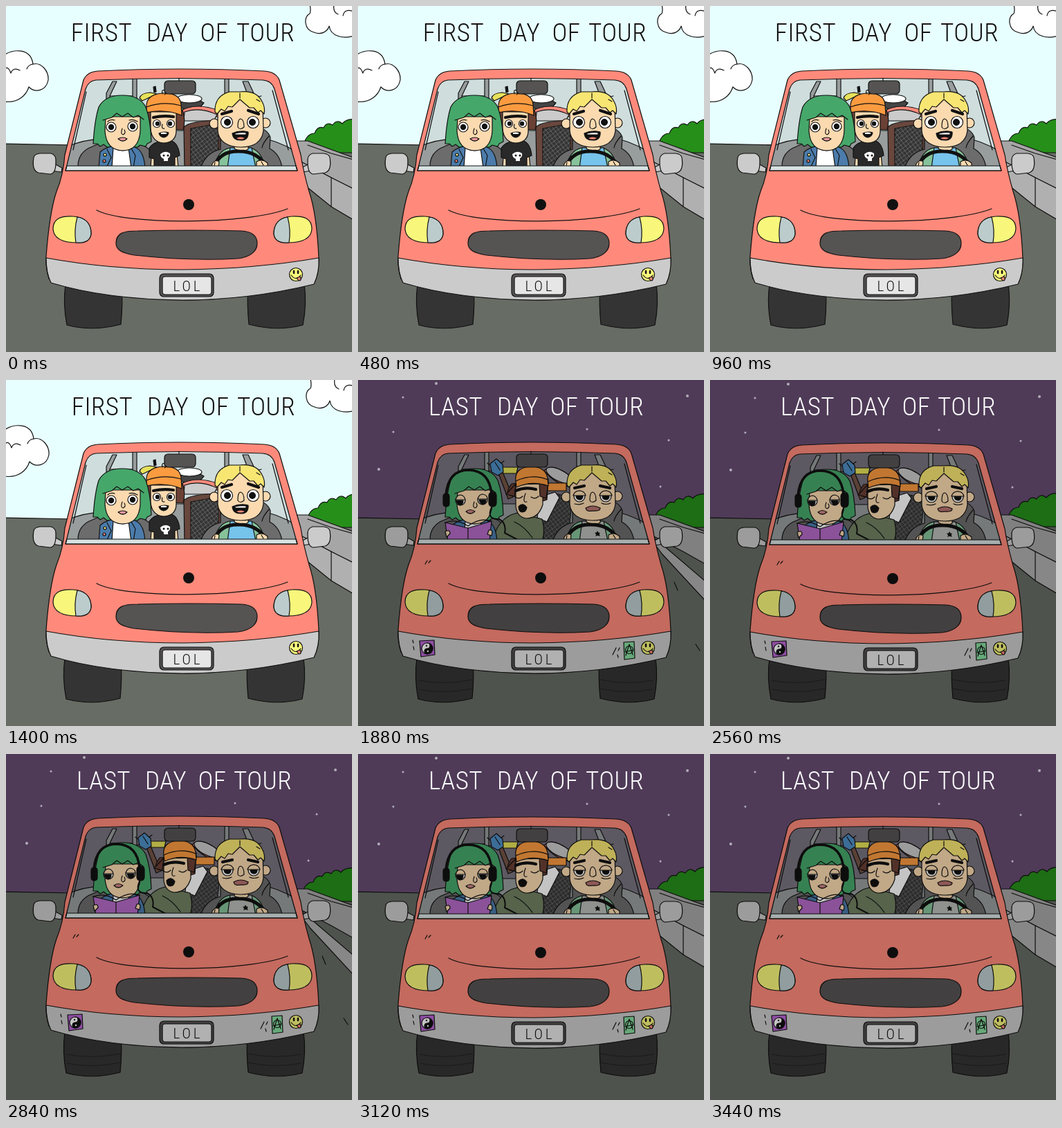
An HTML page for the animation above (3480 ms loop, 500 by 500 pixels).

```html
<!DOCTYPE html>
<html lang="en">
<head>
<meta charset="utf-8">
<title>Tour van</title>
<style>
html, body { margin: 0; width: 100%; height: 100%; overflow: hidden; }
svg { display: block; width: 500px; height: 500px; fill: none; stroke: #111; stroke-width: 1.2; stroke-linecap: round; stroke-linejoin: round; }
text { font-family: "Roboto Condensed", Roboto, sans-serif; font-stretch: 75%; font-weight: 100; text-anchor: middle; stroke: none; }
.title { font-size: 37px; letter-spacing: .5px; fill: #111; }
.title.late { fill: #fff; }
.plate { font-size: 21px; letter-spacing: 4px; fill: #111; }
.bare { stroke: none; }
.ink { fill: #111; }
.white { fill: #fff; }
.skin { fill: #fbdab0; }
.grey { fill: #cbcbcb; }
.seat { fill: #6c6c6c; }
.dark { fill: #565353; }
.red { fill: #ff8a7b; }
.yellow { fill: #f8f77c; }
.orange { fill: #fb9b40; }
.green { fill: #46a76a; }
.blond { fill: #f8e673; }
.brown { fill: #6b4035; }
.denim { fill: #4c7cab; }
.shirt { fill: #86c39a; }
.fat { stroke-width: 4.2; }
</style>
</head>
<body>
<svg viewBox="0 0 500 500">
  <defs>
    <clipPath id="pane"><path d="M130 107Q250 102 371 107Q384 108 388 120L420 232H87L115 120Q119 108 130 107Z"/></clipPath>
    <pattern id="mesh" width="7" height="7" patternUnits="userSpaceOnUse" patternTransform="rotate(8)">
      <path d="M0 0L7 7M7 0L0 7" stroke="#777" stroke-width=".8"/>
    </pattern>
    <g id="wheel">
      <path fill="#343434" d="M86 402Q82 430 88 461Q125 471 166 460Q169 430 167 405Z"/>
    </g>
    <g id="lamp">
      <path class="yellow" d="M68 322C68 307 80 303 97 304C115 305 123 315 123 329C122 339 114 343 103 342C84 342 69 337 68 322Z"/>
      <path fill="#bccccd" d="M103 305C117 307 123 317 123 329C122 339 114 343 101 342Q98 324 103 305Z"/>
    </g>
    <g id="mirror">
      <path class="grey" d="M70 228L81 234L80 240L66 238Z"/>
      <path class="grey" d="M40 219Q41 214 49 213L65 213Q73 215 72 226Q72 242 64 243L47 241Q37 238 40 219Z"/>
    </g>
  </defs>

  <rect id="air" class="bare" width="500" height="210"/>

  <g class="day" id="clouds">
    <path class="white" d="M-3 71C10 62 36 60 39 84C51 81 62 94 61 107C58 123 42 126 33 117C29 130 16 141 -3 138Z"/>
    <path d="M-2 91Q3 86 7 97Q10 88 20 93M39 84Q32 85 30 91"/>
    <path class="white" d="M439 -3C440 4 441 7 439 11C430 15 430 34 445 38C455 42 464 38 467 29C469 44 488 48 503 43V-3Z"/>
    <path d="M474 -2Q472 9 480 12M503 8Q489 3 487 14"/>
  </g>
  <g class="night bare" id="stars" fill="#e8dff0"></g>

  <path fill="#676c64" d="M-2 199L100 201H502V502H-2Z"/>

  <path id="hedge" fill="#268f1a" d="M430 200Q435 184 446 184Q450 173 459 176Q463 167 472 172Q478 163 486 170Q492 162 508 164V212H430Z"/>
  <path fill="#a6a6a6" d="M380 195H436L502 219V266L470 248L420 222Z"/>
  <path d="M436 201L470 213L502 222"/>
  <g id="curb">
    <path fill="#b0b0b0" d="M415 219L470 248L502 264V309L470 290L428 256Z"/>
    <path d="M470 248V290"/>
  </g>
  <g id="gap">
    <path fill="#b0b0b0" d="M415 219L440 238L502 291V319L440 252Z"/>
    <path d="M457 292L462 304M488 382L494 391"/>
  </g>

  <g id="wheels">
    <use href="#wheel"/>
    <use href="#wheel" transform="translate(517) scale(-1 1)"/>
    <g class="night" stroke="#222">
      <path d="M90 434Q125 441 166 433M90 447Q125 454 166 446M351 433Q390 441 427 434M351 446Q390 454 427 447"/>
    </g>
  </g>

  <g id="van">
    <use href="#mirror"/>
    <use href="#mirror" transform="translate(508) scale(-1 1)"/>
    <path class="red" d="M133 94Q250 88 373 94Q390 95 395 107L426 215Q429 236 438 268Q449 300 452 364Q452 383 448 394Q350 426 255 425Q145 424 62 394Q57 378 58 362Q63 297 73 268Q83 244 85 215L112 107Q117 95 133 94Z"/>
    <path class="grey" d="M58 364Q150 381 255 381Q360 380 452 364Q453 386 445 402Q350 425 255 425Q145 424 65 400Q58 386 58 364Z"/>

    <g clip-path="url(#pane)">
      <rect id="glass" class="bare" x="80" y="95" width="350" height="145"/>
      <path fill="#989d9d" d="M80 207Q115 190 145 193V126L154 109H160L150 130V180H350V130L342 109H350L358 126V188Q400 195 430 218V245H80Z"/>
      <path fill="#989d9d" d="M183 104H189V150H183ZM316 104H322V150H316Z"/>
      <path d="M150 130H183M322 130H350M116 124L97 208M385 122L408 208"/>
      <path class="seat" d="M104 234Q103 211 125 203Q150 189 199 202Q215 209 215 234Z"/>

      <g class="day">
        <path fill="#e7e25a" d="M193 133Q195 126 208 125L218 127L197 137Z"/>
        <path class="ink" d="M213 117L216 116L217 124L214 125Z"/>
        <path fill="#444" d="M246 144Q266 127 286 140L280 147Q260 153 246 144Z"/>
        <ellipse class="white" cx="265" cy="134" rx="18" ry="6"/>
        <path class="red" d="M253 151Q276 139 307 151V160H253Z"/>
        <path class="grey" d="M258 153Q280 145 305 157L300 166H257Z"/>
        <path fill="#69473d" d="M257 175Q265 166 309 165L312 234H258Z"/>
        <path fill="#333" d="M267 177L307 170V234H267Z"/>
        <path class="bare" fill="url(#mesh)" d="M267 177L307 170V234H267Z"/>
      </g>
      <g class="night">
        <path fill="#e7e25a" d="M208 127H231L229 136H209Z"/>
        <path fill="#755345" d="M203 136L209 134L224 170L217 173Z"/>
        <path fill="#4e8ec4" d="M191 122L200 115L209 123L210 134L202 139L193 134Z"/>
        <path d="M190 124L187 121M193 132L188 133M207 121L211 118M198 120L205 131"/>
        <path class="red" d="M269 132Q282 119 310 143L307 155Q287 153 269 132Z"/>
        <ellipse class="grey" cx="291" cy="139" rx="21" ry="8" transform="rotate(27 291 139)"/>
        <path class="orange" d="M269 150H301V161H274Z"/>
        <path fill="#393939" d="M280 164L310 171L303 234H261Z"/>
        <path class="bare" fill="url(#mesh)" d="M280 164L310 171L303 234H261Z"/>
      </g>

      <path class="seat" d="M281 234Q289 212 310 207V179Q315 169 360 174Q378 177 382 190L381 206Q396 214 399 234Z"/>
      <path d="M380 188Q371 198 370 205"/>

      <!-- back seat -->
      <g class="day">
        <path class="skin" d="M211 205L246 203L249 234H209Z"/>
        <path fill="#292929" d="M207 205Q214 196 226 195H239Q249 198 251 216L244 219V234H214V221L207 219Z"/>
        <path class="brown" d="M205 150H255Q260 164 256 179L207 176Q201 164 205 150Z"/>
        <path class="skin" d="M209 153H246V180Q246 197 228 198Q211 197 209 178Z"/>
        <path class="orange" d="M203 146Q202 128 226 126Q251 125 253 142L254 158Q229 148 203 154Z"/>
        <path d="M203 146Q228 137 253 144M226 127Q224 120 230 122Q234 126 229 128"/>
        <path class="fat" d="M213 161Q227 158 242 160"/>
        <circle class="white" cx="218" cy="170" r="5.5"/><circle class="white" cx="238" cy="170" r="5.5"/>
        <circle class="ink" cx="219" cy="170" r="2.6"/><circle class="ink" cx="237" cy="170" r="2.6"/>
        <path d="M226 171Q224 178 229 177"/>
        <path class="ink" d="M221 184Q228 181 235 183Q234 189 228 190Q222 189 221 184Z"/>
        <path class="white bare" d="M224 183Q228 182 232 183V185H224Z"/>
        <path class="white bare" d="M223 214Q230 208 237 213Q238 218 234 220V224H228V221Q223 219 223 214Z"/>
        <circle class="ink bare" cx="228" cy="216" r="1.5"/><circle class="ink bare" cx="234" cy="216" r="1.5"/>
      </g>
      <g class="night">
        <path class="white" d="M262 170L285 163L291 171L273 206L259 200Z"/>
        <path fill="#718061" d="M195 234Q201 200 230 193L266 202Q271 219 266 234Z"/>
        <path d="M226 206Q241 213 252 229"/>
        <path class="brown" d="M222 151L275 144L273 174L264 177L220 168Q212 164 222 151Z"/>
        <path class="skin" d="M228 152L267 151L267 181Q261 201 243 201Q230 199 228 184Z"/>
        <path class="brown" d="M228 151L214 166L226 169ZM262 149L275 148L272 172L263 169Z"/>
        <path class="orange" d="M228 148Q225 128 249 126Q271 126 274 143L275 154Q251 146 229 156Z"/>
        <path d="M228 147Q252 136 274 145"/>
        <path class="fat" d="M228 161Q242 155 257 159"/>
        <path d="M227 170Q233 174 238 169M250 170Q256 174 261 169M242 165Q237 179 244 177"/>
        <path class="ink" d="M232 184Q238 177 244 185Q243 192 237 192Q232 191 232 184Z"/>
      </g>

      <!-- passenger -->
      <path class="green" d="M134 146Q143 129 168 129Q193 129 202 146Q209 165 210 196L204 199L202 203L194 201L190 204H146L141 200L136 203L132 199L126 199Q128 165 134 146Z"/>
      <path class="denim" d="M134 234L136 211Q149 200 164 203H181Q199 204 201 234Z"/>
      <path class="white" d="M155 204L177 205L181 234H153Z"/>
      <path class="skin" d="M160 197H176V206Q169 212 160 205Z"/>
      <path class="skin" d="M144 160H194V181Q192 209 168 209Q145 208 143 181Z"/>
      <path class="green bare" d="M138 150L199 150L199 164L191 158L184 161L176 155L168 160L160 155L153 161L140 165Z"/>
      <path d="M140 165L153 161L160 155L168 160L176 155L184 161L191 158L199 164"/>
      <path d="M168 177Q165 185 169 186Q174 184 171 179"/>
      <g class="day">
        <path d="M147 167Q151 163 157 165M178 165Q184 163 190 167"/>
        <circle class="white" cx="152" cy="175" r="7"/><circle class="white" cx="183" cy="174" r="7"/>
        <circle class="ink" cx="152" cy="175" r="3.6"/><circle class="ink" cx="183" cy="174" r="3.6"/>
        <path fill="#f29aa0" d="M162 192Q169 188 175 192Q169 198 162 192Z"/>
        <path d="M146 207L152 219L145 234M181 206L187 216L184 234"/>
        <circle class="yellow" cx="143" cy="215" r="2"/><circle class="red" cx="142" cy="224" r="2"/>
      </g>
      <g class="night">
        <circle class="white" cx="148" cy="175" r="7"/><circle class="white" cx="180" cy="174" r="7"/>
        <path class="ink" d="M142 175H152Q152 182 147 182Q143 180 142 175ZM175 174H185Q185 181 180 181Q176 179 175 174Z"/>
        <path class="skin" d="M141 174Q143 167 148 167Q154 168 155 174ZM173 173Q175 166 180 166Q187 167 187 173Z"/>
        <path fill="#cf8580" d="M156 191Q162 186 169 191Q162 197 156 191Z"/>
        <path stroke-width="3.5" d="M127 168Q130 131 160 131Q190 132 193 166"/>
        <rect class="ink" x="123" y="165" width="9" height="19" rx="4"/>
        <rect class="ink" x="189" y="163" width="11" height="21" rx="5"/>
        <path stroke-width="2" d="M194 183Q184 203 204 202Q215 208 212 222L235 234"/>
        <path fill="#b56ac8" d="M126 207L159 215L193 205L190 234H130Z"/>
        <path d="M159 215V234M126 207Q143 201 159 212Q177 199 193 205"/>
        <path class="skin" d="M126 220Q133 216 133 223L128 228ZM189 218Q196 216 193 226L187 224Z"/>
      </g>

      <!-- driver -->
      <path class="shirt" d="M301 234Q305 209 323 205H354Q371 211 374 234Z"/>
      <path class="tee" d="M324 205H355L361 234H320Z"/>
      <path class="skin" d="M330 198H350V207Q341 213 330 206Z"/>
      <circle class="skin" cx="301" cy="170" r="7"/><circle class="skin" cx="375" cy="169" r="7"/>
      <path class="skin" d="M306 145Q338 125 371 145L372 180Q369 204 339 204Q309 203 306 181Z"/>
      <path class="blond" d="M302 153Q301 130 323 124L337 124Q362 121 370 138Q375 147 373 156L368 151L364 154L358 147L352 147L338 135L327 146L321 145L316 152L311 149L305 156Z"/>
      <path d="M338 126V133M365 131L369 130M362 135L367 138"/>
      <path d="M339 163Q335 163 335 175Q338 180 344 175Q344 164 339 163Z"/>
      <g class="day">
        <path class="fat" d="M312 156L326 152M350 151L365 156"/>
        <circle class="white" cx="319" cy="168" r="8.5"/><circle class="white" cx="357" cy="168" r="8.5"/>
        <circle class="ink" cx="320" cy="168" r="4.4"/><circle class="ink" cx="356" cy="168" r="4.4"/>
        <path class="ink" d="M327 184Q338 179 350 182Q351 194 339 194Q328 194 327 184Z"/>
        <path class="white" d="M331 184Q339 182 347 183V186H331Z"/>
        <path class="red bare" d="M333 191Q339 188 345 191Q339 194 333 191Z"/>
      </g>
      <g class="night">
        <path class="fat" d="M313 157L327 154M350 154L364 157"/>
        <g id="awake">
          <circle class="white" cx="320" cy="169" r="8"/><circle class="white" cx="358" cy="169" r="8"/>
          <path class="ink" d="M315 168H325Q325 174 320 174Q315 173 315 168ZM353 168H363Q363 174 358 174Q353 173 353 168Z"/>
          <path class="skin" d="M311 168Q313 161 320 161Q327 161 329 168ZM349 168Q351 161 358 161Q365 161 367 168Z"/>
          <path d="M313 180Q320 182 326 179M352 179Q358 182 365 179"/>
          <path fill="#b7736f" d="M329 186Q339 180 350 186Q350 191 339 190Q330 192 329 186Z"/>
        </g>
        <g id="asleep">
          <path d="M311 169Q319 177 328 169M349 169Q358 177 367 169"/>
          <path fill="#b7736f" d="M329 186Q339 178 350 186Q349 192 339 190Q331 192 329 186Z"/>
          <path class="white" d="M333 185Q339 182 346 185Z"/>
        </g>
        <path class="ink" d="M346 220L347 222L349 222L348 224L349 226L346 225L344 226L345 224L343 222L345 222Z"/>
      </g>
      <path stroke-width="5" d="M301 232Q309 209 337 210Q364 210 376 232"/>
      <path class="skin" d="M298 228Q303 221 308 225L307 234H297ZM362 225Q370 220 378 227V234H362Z"/>
      <path d="M302 226L301 231M369 225L372 230"/>
    </g>

    <path d="M250 104V109"/>
    <rect class="dark" x="229" y="108" width="45" height="19" rx="5"/>
    <path fill="#d8e2e2" d="M88 231H419L421 238H86Z"/>
    <path d="M130 107Q250 102 371 107Q384 108 388 120L421 238H86L115 120Q119 108 130 107Z"/>

    <circle class="ink bare" cx="264" cy="287" r="8"/>
    <path d="M131 295C172 317 348 316 407 293"/>
    <path class="dark" d="M159 343C159 328 170 325 190 325Q265 323 340 325C357 326 363 333 363 343C363 356 351 363 335 365Q265 369 185 360C167 357 159 352 159 343Z"/>
    <use href="#lamp"/>
    <use href="#lamp" transform="translate(510) scale(-1 1)"/>
    <rect class="dark" x="222" y="387" width="78" height="33" rx="6"/>
    <rect fill="#e6e6e6" x="226" y="391" width="71" height="26" rx="4"/>
    <text class="plate" x="263" y="412">LOL</text>

    <circle class="yellow" cx="419" cy="388" r="9.5"/>
    <path class="ink" d="M416 383V386M422 383V386" stroke-width="2.5"/>
    <path d="M412 389Q419 398 426 389"/>
    <path class="red" d="M420 393L425 391Q428 397 423 397Z"/>

    <g class="night">
      <path d="M97 267L100 262M102 265L105 262M79 377L80 381M80 386L81 391M373 388L368 398M378 388L376 392M375 398L376 402"/>
      <path fill="#b764d1" d="M89 378L110 377L111 398L91 401Z"/>
      <circle class="white" cx="100" cy="389" r="8"/>
      <path class="ink" d="M100 381A4 4 0 0 1 100 389A4 4 0 0 0 100 397A8 8 0 0 0 100 381Z"/>
      <circle class="ink bare" cx="99" cy="385" r="1.2"/><circle class="white bare" cx="101" cy="393" r="1.2"/>
      <path fill="#86db9e" d="M384 380L399 379L400 403L385 405Z"/>
      <circle cx="392" cy="391" r="5.5"/><path d="M387 399L392 383L397 398M386 394L398 391"/>
    </g>
  </g>

  <rect class="night bare" width="500" height="500" fill="#000" opacity=".23"/>

  <g class="day title" id="first">
    <text x="138" y="51">FIRST</text><text x="233" y="51">DAY</text><text x="301" y="51">OF</text><text x="375" y="51">TOUR</text>
  </g>
  <g class="night title late">
    <text x="141" y="51">LAST</text><text x="231" y="51">DAY</text><text x="298" y="51">OF</text><text x="371" y="51">TOUR</text>
  </g>
</svg>
<script>
const LOOP = 3480, STEP = 40, DUSK = 1720, NAP = [2200, 2560];
const hedgeX = [0, -1, 2, 5, 4, 3, 1, -2];
const starAt = [[113, 6], [65, 26], [51, 76], [30, 130], [331, 72], [437, 155], [476, 24], [449, 88]];

const $ = id => document.getElementById(id);
const all = name => document.querySelectorAll("." + name);
const show = (el, on) => { el.style.display = on ? "" : "none"; };
const move = (id, x, y) => $(id).setAttribute("transform", `translate(${x} ${y})`);
const days = all("day"), nights = all("night"), tee = document.querySelector(".tee");

$("stars").innerHTML = starAt.map(([x, y], i) =>
  `<circle cx="${x}" cy="${y}" r="${i % 3 ? 1.5 : 2}"/>`).join("");

function draw(t) {
  const n = Math.floor(t / STEP), odd = n % 2, phase = n % 8;
  const night = t >= DUSK, nap = t >= NAP[0] && t < NAP[1];

  days.forEach(el => show(el, !night));
  nights.forEach(el => show(el, night));
  $("air").setAttribute("fill", night ? "#674d72" : "#e8ffff");
  $("glass").setAttribute("fill", night ? "#79747f" : "#cfdddd");
  tee.setAttribute("fill", night ? "#b9bcb9" : "#76c3ec");

  move("van", 0, -odd);
  move("wheels", -odd, 0);
  move("clouds", odd, odd);
  move("stars", 0, -odd);
  move("first", odd, 0);
  move("hedge", hedgeX[phase], odd);
  show($("gap"), phase === 7);
  show($("curb"), phase !== 7);
  show($("awake"), !nap);
  show($("asleep"), nap);
}

const start = performance.now();
function tick() {
  draw((performance.now() - start) % LOOP);
  requestAnimationFrame(tick);
}
tick();
</script>
</body>
</html>
```
